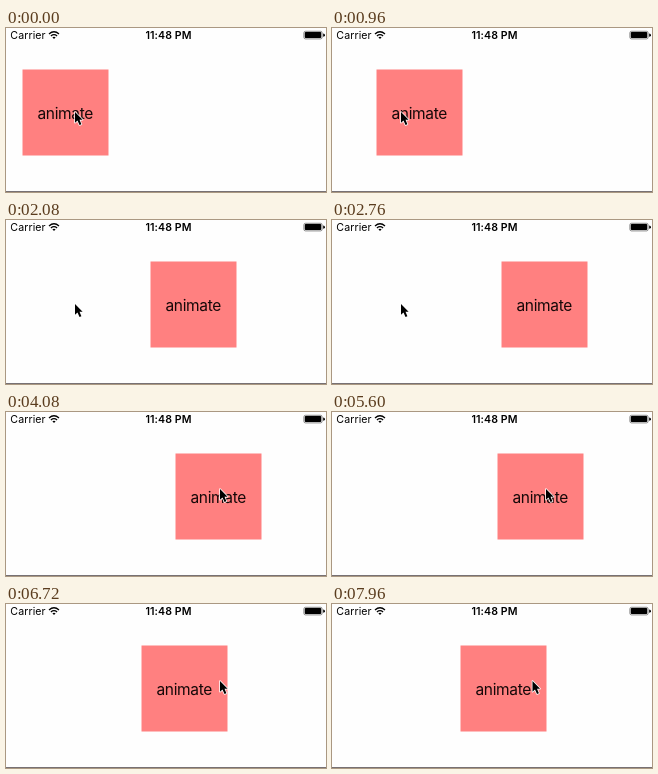
Recreate the animation shown at these times as an HTML page. Size 320 by 164 pixels, loop 8 s.

```html
<!DOCTYPE html>
<html lang="en">
<head>
<meta charset="utf-8">
<title>Animated square</title>
<style>
  html, body { margin: 0; width: 100%; height: 100%; overflow: hidden; background: #fefefe; }
  svg { display: block; width: 100%; height: 100%; }
  text { font-family: Inter, "Liberation Sans", sans-serif; fill: #000; }
  .status { font-size: 10.6px; letter-spacing: .1px; }
  .clock { font-weight: 600; text-anchor: middle; }
  .label { font-size: 15.5px; letter-spacing: -.35px; text-anchor: middle; fill: #160808; }
</style>
</head>
<body>
<svg viewBox="0 0 320 164">
  <rect width="320" height="164" fill="#fefefe"/>
  <rect y="163" width="320" height="1" fill="#777174"/>

  <text class="status" x="4.3" y="11">Carrier</text>
  <g fill="none" stroke="#000" stroke-width="1.3">
    <path d="M43 6Q48 1.6 53 6"/>
    <path d="M44.9 8Q48 5.4 51.1 8"/>
  </g>
  <path d="M46.4 9.3Q48 8 49.6 9.3L48 11Z"/>
  <text class="status clock" x="162.5" y="11">11:48 PM</text>
  <rect x="297.9" y="3.3" width="18.2" height="7.6" rx="1.6" fill="#fefefe" stroke="#555" stroke-width=".7"/>
  <rect x="298.8" y="4.1" width="16.4" height="6" rx=".8"/>
  <path d="M317.2 5.6Q319 6 319 7.2T317.2 8.8Z"/>

  <g id="square">
    <rect x=".5" y="41.5" width="86" height="86" fill="#ff8080"/>
    <text class="label" x="43.2" y="90.5">animate</text>
  </g>
  <g id="cursor">
    <path d="M0 0V10.8L2.5 8.6L4.5 13L6.4 12.2L4.5 7.8H7.6Z"
          fill="#000" stroke="#fff" stroke-width="1.5" paint-order="stroke" stroke-linejoin="round"/>
  </g>
</svg>
<script>
  const LOOP = 8000, TICK = 40;
  const square = document.getElementById('square');
  const cursor = document.getElementById('cursor');

  // Progress from 0 to 1 between two times, eased at both ends.
  function ease(t, begin, end) {
    const u = Math.min(1, Math.max(0, (t - begin) / (end - begin)));
    return (1 - Math.cos(Math.PI * u)) / 2;
  }

  const place = (node, x, y) => node.setAttribute('transform', `translate(${x} ${y})`);

  function pose(t) {
    const squareX = 16 + 153 * ease(t, 260, 2740) - 41 * ease(t, 5160, 7280);
    place(square, Math.round(squareX), 0);

    // The pointer runs past the square's label, returns, and later drifts left.
    const reach = ease(t, 2880, 3640);
    const cursorX = 69 + 159 * reach - 14 * ease(t, 3720, 4040) - 13.5 * ease(t, 7680, 7920);
    place(cursor, cursorX, 84 - 7 * reach);
  }

  const start = performance.now();
  function draw() {
    const elapsed = (performance.now() - start) % LOOP;
    pose(Math.floor(elapsed / TICK) * TICK);
    requestAnimationFrame(draw);
  }
  draw();
</script>
</body>
</html>
```
